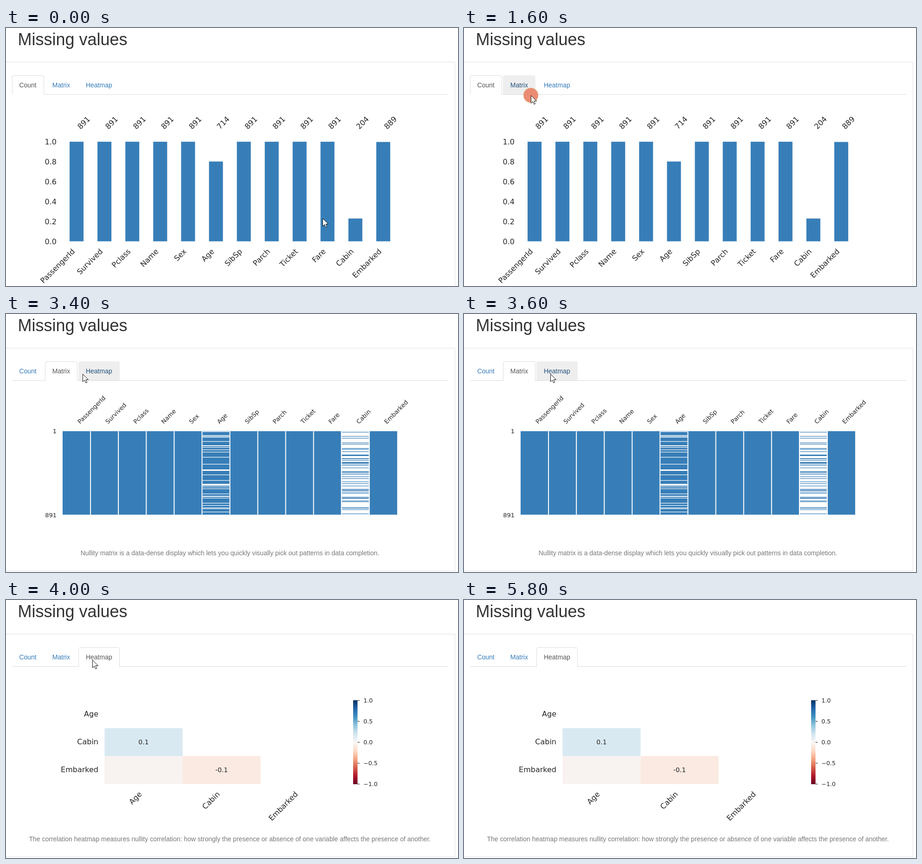
An HTML page with a canvas that plays this animation: 974 px wide and 556 px high, repeating every 6200 ms.

```html
<!DOCTYPE html>
<html lang="en">
<head>
<meta charset="utf-8">
<title>Missing values</title>
<style>
  html, body { margin: 0; width: 100%; height: 100%; overflow: hidden; background: #fff; }
  canvas { display: block; }
</style>
</head>
<body>
<canvas id="stage" width="974" height="556"></canvas>
<script>
const ctx = document.getElementById('stage').getContext('2d');
const LOOP = 6200;
const UI = '"Liberation Sans", Arial, sans-serif';
const PLOT = '"DejaVu Sans", sans-serif';
const BLUE = '#377eb8', INK = '#262626', LINE = '#ddd';

const COLUMNS = ['PassengerId', 'Survived', 'Pclass', 'Name', 'Sex', 'Age',
  'SibSp', 'Parch', 'Ticket', 'Fare', 'Cabin', 'Embarked'];
const FILLED = { Age: 714, Cabin: 204, Embarked: 889 };
const TOTAL = 891;
const LEFT = 122, PITCH = 60.08;

// Row marks in the matrix: thin ones are 1px, thick ones are [y, height]
const AGE_GAPS = [253, 261, 263, 265, 274, [283, 2], 287, 292, 297, 308, 323, [335, 3], 346,
  358, [366, 4], 372, 376, 387, [392, 2], 396, 407, 412, 417, 419, 426];
const CABIN_ROWS = [254, 263, 267, 277, 280, 289, 291, 296, [303, 3], [311, 2], 315, [319, 3],
  323, 326, 331, [339, 2], 342, 345, 350, 354, 361, 365, 370, 377, [379, 2], 383, 386,
  394, [396, 2], 402, 404, [417, 2], 421, 430];

const TABS = [
  { name: 'Count', x: 13, end: 82, textX: 28.4 },
  { name: 'Matrix', x: 84, end: 154, textX: 99.8 },
  { name: 'Heatmap', x: 156, end: 245, textX: 171.9 }
];

// Pointer stops: start time, x, y, pressed
const STOPS = [
  [0, 682, 410], [400, 457, 304], [600, 243, 203], [800, 170, 162], [1000, 138, 137],
  [1200, 128, 129], [1600, 144, 145, true], [1800, 128, 129], [3400, 165, 129],
  [3600, 186, 129], [3800, 202, 145, true], [4000, 186, 129], [5200, 186, 138],
  [5400, 186, 370], [5600, 190, 496], [5800]
];

function rect(x, y, w, h, color) {
  ctx.fillStyle = color;
  ctx.fillRect(x, y, w, h);
}

function text(str, x, y, size, { font = PLOT, color = INK, align = 'left' } = {}) {
  ctx.font = `${size}px ${font}`;
  ctx.fillStyle = color;
  ctx.textAlign = align;
  ctx.fillText(str, x, y);
}

function slanted(str, x, y, size, align) {
  ctx.save();
  ctx.translate(x, y);
  ctx.rotate(-Math.PI / 4);
  text(str, 0, 0, size, { align });
  ctx.restore();
}

function drawTabs(active, hover) {
  rect(13, 143, 940, 1, LINE);
  TABS.forEach(({ name, x, end, textX }, i) => {
    let color = '#337ab7';
    if (i === active) {
      color = '#555';
      rect(x, 143, end - x, 1, '#fff');
      ctx.beginPath();
      ctx.moveTo(x + 0.5, 144);
      ctx.arcTo(x + 0.5, 102.5, x + 8, 102.5, 3.5);
      ctx.arcTo(end - 0.5, 102.5, end - 0.5, 110, 3.5);
      ctx.lineTo(end - 0.5, 144);
      ctx.strokeStyle = LINE;
      ctx.lineWidth = 1;
      ctx.stroke();
    } else if (i === hover) {
      color = '#23527c';
      ctx.beginPath();
      ctx.roundRect(x, 102, end - x, 41, [4, 4, 0, 0]);
      ctx.fillStyle = '#eee';
      ctx.fill();
    }
    text(name, textX, 128, 14, { font: UI, color });
  });
}

function drawPage(active, hover) {
  rect(0, 0, 974, 556, '#fff');
  text('Missing values', 25.5, 37, 36, { font: UI, color: '#333' });
  rect(0, 73, 968, 1, '#e0e0e0');
  rect(967, 73, 1, active ? 481 : 483, '#e0e0e0');
  if (active) rect(0, 553, 968, 1, '#e0e0e0');
  drawTabs(active, hover);
}

function caption(str) {
  text(str, 482.4, 520, 14, { font: UI, color: '#777', align: 'center' });
}

function drawCount() {
  const base = 459.7, height = 214.6;
  for (let i = 0; i <= 5; i++) {
    text((i / 5).toFixed(1), 109, 466 - i * 42.95, 16, { align: 'right' });
  }
  COLUMNS.forEach((name, i) => {
    const count = FILLED[name] ?? TOTAL;
    const mid = LEFT + PITCH * (i + 0.5);
    const h = height * count / TOTAL;
    rect(mid - PITCH / 4, base - h, PITCH / 2, h, BLUE);
    slanted(count, mid + 8.6, 219, 16, 'left');
    slanted(name, mid - 2.7, 482.5, 16, 'right');
  });
}

function drawMatrix() {
  const top = 252.5, height = 180;
  const marks = (list, x, color) => list.forEach(m => {
    const [y, h] = [m].flat();
    rect(x, y, PITCH - 2, h || 1.2, color);
  });
  COLUMNS.forEach((name, i) => {
    const x = LEFT + PITCH * i;
    rect(x, top, PITCH, height, name === 'Cabin' ? '#fff' : BLUE);
    if (name === 'Age') marks(AGE_GAPS, x + 1, '#fff');
    if (name === 'Cabin') marks(CABIN_ROWS, x + 1, BLUE);
    slanted(name, x + PITCH / 2 + 7.7, 237.5, 13, 'left');
  });
  for (let i = 1; i < COLUMNS.length; i++) rect(LEFT + PITCH * i - 1, top, 2, height, '#fff');
  text('1', 109, 257.3, 13, { align: 'right' });
  text(TOTAL, 109, 437.5, 13, { align: 'right' });
  caption('Nullity matrix is a data-dense display which lets you quickly visually pick out patterns in data completion.');
}

function drawColorBar() {
  const top = 216, height = 181;
  const ramp = ctx.createLinearGradient(0, top, 0, top + height);
  ['#053061', '#2166ac', '#4393c3', '#92c5de', '#d1e5f0', '#f7f7f7',
    '#fddbc7', '#f4a582', '#d6604d', '#b2182b', '#67001f']
    .forEach((c, i) => ramp.addColorStop(i / 10, c));
  rect(748, top, 9.5, height, ramp);
  ['1.0', '0.5', '0.0', '\u22120.5', '\u22121.0'].forEach((label, i) => {
    const y = top + i * 45.1;
    rect(757.5, y - 0.2, 4.5, 1.1, INK);
    text(label, 770.2, y + 5, 12.6);
  });
}

function drawHeatmap() {
  const x0 = 212.4, y0 = 216, w = 168.1, h = 60.2;
  const cell = (col, row, color, label = '') => {
    rect(x0 + col * w, y0 + row * h, w, h, color);
    text(label, x0 + (col + 0.5) * w, y0 + (row + 0.5) * h + 4.6, 14, { align: 'center' });
  };
  cell(0, 1, '#d9e9f2', '0.1');
  cell(0, 2, '#f8f2f0');
  cell(1, 2, '#fbeae1', '-0.1');
  Object.keys(FILLED).forEach((name, i) => {
    text(name, 199, 251 + i * h, 16, { align: 'right' });
    slanted(name, x0 + (i + 0.5) * w - 2.7, 419.6, 16, 'right');
  });
  drawColorBar();
  caption('The correlation heatmap measures nullity correlation: how strongly the presence or absence of one variable affects the presence of another.');
}

const ARROW = new Path2D('M0 0V16.5L3.9 12.9L6.6 19L9.2 17.9L6.6 12H12Z');

function drawPointer([, x, y, pressed]) {
  if (x === undefined) return;
  if (pressed) {
    ctx.beginPath();
    ctx.arc(x, y, 15.8, 0, 2 * Math.PI);
    ctx.fillStyle = '#ea8c74';
    ctx.fill();
    ctx.strokeStyle = '#dfb36c';
    ctx.lineWidth = 0.8;
    ctx.stroke();
  }
  ctx.save();
  ctx.translate(x + 0.5, y + 0.5);
  ctx.fillStyle = '#fff';
  ctx.fill(ARROW);
  ctx.strokeStyle = '#111';
  ctx.lineWidth = 1;
  ctx.stroke(ARROW);
  ctx.restore();
}

const VIEWS = [drawCount, drawMatrix, drawHeatmap];
const between = (t, from, to) => t >= from && t < to;

function draw(t) {
  const active = t < 1800 ? 0 : t < 4000 ? 1 : 2;
  const hover = between(t, 1000, 1800) ? 1 : between(t, 3400, 4000) ? 2 : -1;
  drawPage(active, hover);
  VIEWS[active]();
  drawPointer(STOPS.findLast(s => s[0] <= t));
}

const start = performance.now();
function tick() {
  draw((performance.now() - start) % LOOP);
  requestAnimationFrame(tick);
}
tick();
</script>
</body>
</html>
```
